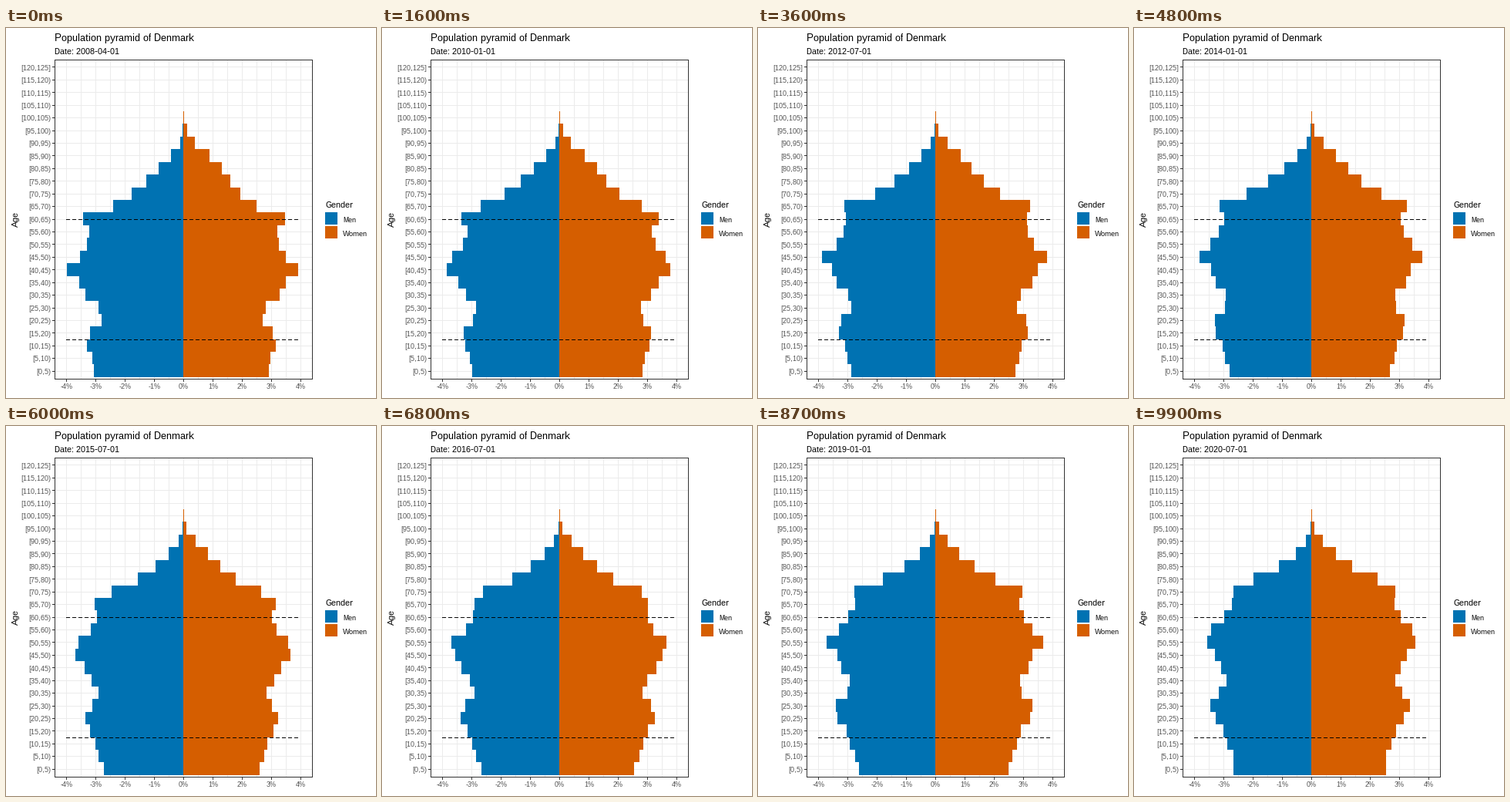
Write a matplotlib script that moves like this. It is 480 px wide and 480 px high and loops after 10 s.

```python
import numpy as np
import matplotlib.pyplot as plt
from matplotlib.animation import FuncAnimation
from matplotlib.patches import Rectangle

plt.rcParams.update({
    "font.family": "Liberation Sans",
    "text.hinting": "native",
    "text.hinting_factor": 1,
    "text.kerning_factor": 6,
})

SIZE, DPI = 480, 72          # at 72 dpi one point is one pixel
FRAMES, STEP_MS = 100, 100
STEPS_PER_YEAR = 8           # each quarter: one half step, one full step
BLUE, ORANGE = "#0072B2", "#D55E00"
GRID, DARK, GREY = "#EBEBEB", "#333333", "#4D4D4D"
LEFT, RIGHT, TOP, BOTTOM = 63, 397, 41, 455
ZERO, PERCENT = 230, 38      # column of 0 %, pixels per percent
BASE, PITCH, BINS, BARS = 454.555, 16.425, 25, 21

# Births behind each five-year cohort, by its mid age at the start
COHORT_AGE = np.arange(-12.5, 105, 5)
COHORT = np.array([113, 104.5, 110.5, 115.7, 117.2, 122.8, 116, 97.5,
                   95, 104.7, 108.7, 120.7, 107.4, 101, 100.5, 110.9,
                   82.4, 67.2, 57.5, 52.2, 44.7, 33, 30, 30])
SLOPE = np.gradient(COHORT, 5)
AGE = np.arange(BARS) * 5 + 2.5


def cohort_size(u):
    """Smooth curve through the cohort points."""
    i = np.clip(((u - COHORT_AGE[0]) // 5).astype(int), 0, len(COHORT) - 2)
    s = (u - COHORT_AGE[i]) / 5
    ease = s * s * (3 - 2 * s)
    bend = s * (1 - s) ** 2 * SLOPE[i] - s * s * (1 - s) * SLOPE[i + 1]
    return COHORT[i] * (1 - ease) + COHORT[i + 1] * ease + 5 * bend


def ageing(moved_in, rate, growth):
    """Immigration of young adults, then mortality rising with age."""
    return np.exp(moved_in / (1 + np.exp((25 - AGE) / 5))
                  - rate * np.exp(growth * AGE))


MEN = ageing(0.24, 8.36e-5, 0.11)
WOMEN = 0.953 * ageing(0.27, 2.92e-5, 0.118)


def lengths(x):
    """Bar lengths in pixels for men and women."""
    years = (x - 1) / STEPS_PER_YEAR
    u = AGE - years
    share = cohort_size(u) * np.exp(-0.005 * years)
    widows = np.exp(0.0009 * np.maximum(u - 67, 0) ** 2)
    men, women = share * MEN, share * WOMEN * widows
    return np.rint(men - 0.25), np.rint(women + 0.25)


def date_text(x):
    month = 3 + 3 * ((x - 1) // 2)
    return f"Date: {2008 + month // 12}-{month % 12 + 1:02d}-01"


def row_y(k):
    return BASE - (k - 0.4) * PITCH


fig = plt.figure(figsize=(SIZE / DPI, SIZE / DPI), dpi=DPI, facecolor="white")
ax = fig.add_axes([0, 0, 1, 1])
ax.set(xlim=(0, SIZE), ylim=(SIZE, 0))
ax.axis("off")


def box(x, y, w, h, color, z=3):
    return ax.add_patch(Rectangle((x, y), w, h, fc=color, lw=0,
                                  antialiased=False, zorder=z))


def label(x, y, text, size, color="black", ha="left", **kw):
    return ax.text(x, y, text, fontsize=size, color=color, ha=ha,
                   va="baseline", **kw)


# Grid, ticks and axis labels
for n in range(-8, 9):
    x = ZERO + n * PERCENT // 2
    box(x, TOP, 1, BOTTOM - TOP, GRID, 1)
    if n % 2 == 0:
        box(x, BOTTOM + 1, 1, 3, DARK)
        label(x + 0.5, 468, f"{n // 2}%", 9, GREY, "center")

for k in range(1, BINS + 1):
    y = round(row_y(k))
    box(LEFT, y, RIGHT - LEFT, 1, GRID, 1)
    box(LEFT - 3, y, 3, 1, DARK)
    close = "]" if k == BINS else ")"
    label(58, round(row_y(k) + 4.2), f"[{5 * k - 5},{5 * k}{close}", 9, GREY, "right")

# Panel border
for x in (LEFT, RIGHT):
    box(x, TOP, 1, BOTTOM - TOP + 1, DARK, 5)
for y in (TOP, BOTTOM):
    box(LEFT, y, RIGHT - LEFT + 1, 1, DARK, 5)

# Bars
men_bars, women_bars = [], []
for k in range(1, BARS + 1):
    low, high = round(row_y(k - 0.5)), round(row_y(k + 0.5))
    men_bars.append(box(ZERO, high, 0, low - high, BLUE))
    women_bars.append(box(ZERO, high, 0, low - high, ORANGE))

# Dashed lines
for k in (3.5, 13):
    for x in range(ZERO - 4 * PERCENT, ZERO + 4 * PERCENT, 8):
        box(x, round(row_y(k)), 5, 1, "black", 4)

# Titles and legend
label(63, 17, "Population pyramid of Denmark", 13)
date = label(63, 34, "", 11)
label(16, 248, "Age", 11, ha="center", rotation=90, rotation_mode="anchor")
label(414, 233, "Gender", 11)
for y, name, color in ((239, "Men", BLUE), (257, "Women", ORANGE)):
    box(414, y, 16, 16, color)
    label(437, y + 13, name, 9)


def update(i):
    x = max(i, 1)
    men, women = lengths(x)
    for bar, w in zip(men_bars, men):
        bar.set_x(ZERO - w)
        bar.set_width(w)
    for bar, w in zip(women_bars, women):
        bar.set_width(w)
    date.set_text(date_text(x))
    return [*men_bars, *women_bars, date]


anim = FuncAnimation(fig, update, frames=FRAMES, interval=STEP_MS, repeat=True)
plt.show()
```
